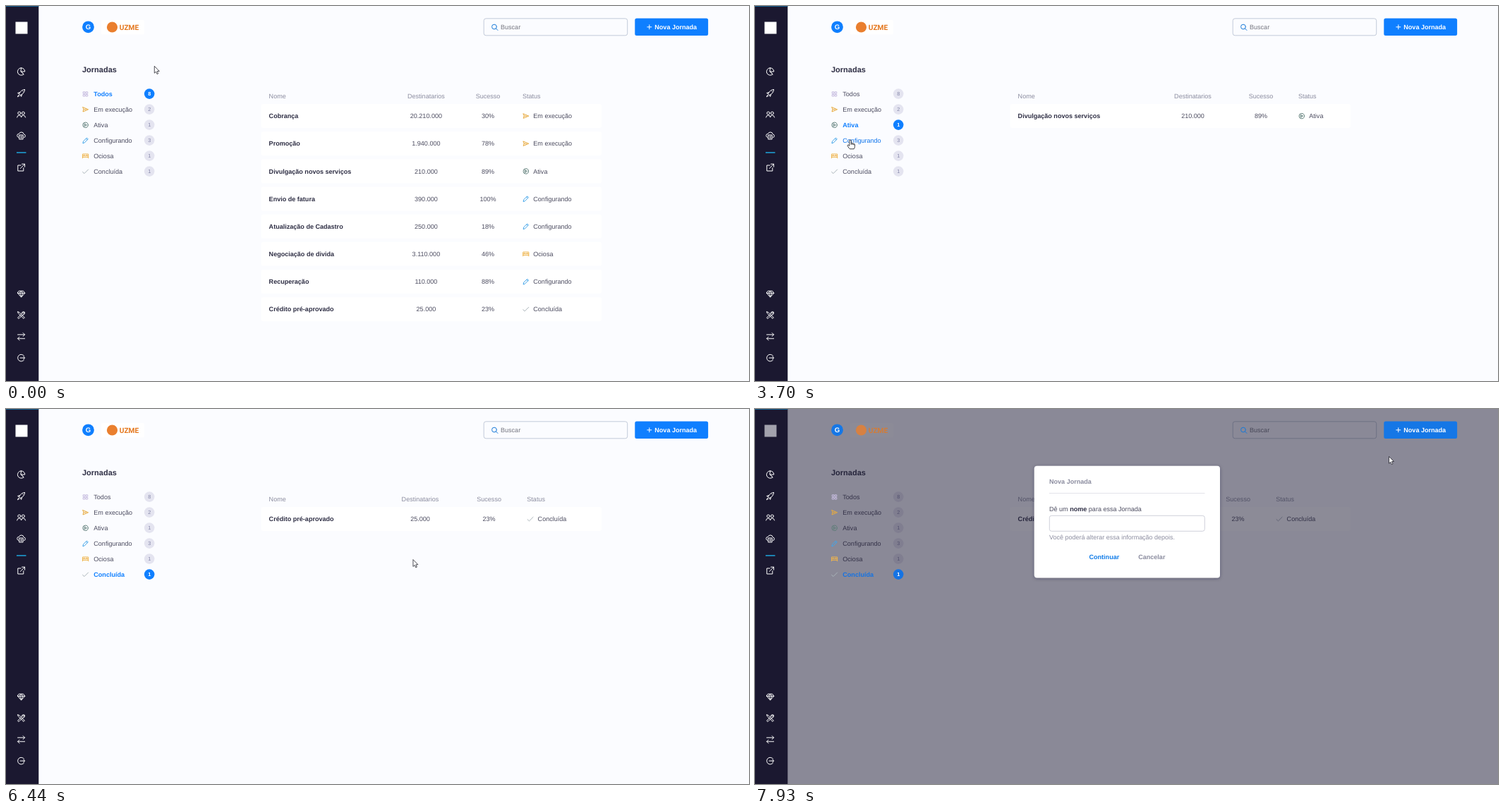
An HTML page for the animation above (8 s loop, 1053x532 px).

```html
<!DOCTYPE html>
<html lang="pt">
<head>
<meta charset="utf-8">
<title>Jornadas</title>
<style>
html, body { margin: 0; width: 100%; height: 100%; overflow: hidden; background: #fbfcff; }
svg { display: block; width: 1053px; height: 532px; }
text { font: 9.05px "Liberation Sans", Arial, sans-serif; fill: #4c4c60; text-rendering: geometricPrecision; white-space: pre; }
.b { font-weight: 700; }
.mid { text-anchor: middle; }
.name { font-weight: 700; fill: #2e2e44; }
.head, .mute { fill: #8b8c9f; }
.line { fill: none; stroke-width: 1; stroke-linecap: round; stroke-linejoin: round; }
.num { font-size: 7.4px; text-anchor: middle; }
#side .line { stroke: #fff; }
</style>
</head>
<body>
<svg viewBox="0 0 1053 532">
  <defs>
    <linearGradient id="glow"><stop offset="0" stop-color="#00e2ff"/><stop offset="1" stop-color="#0f7fff"/></linearGradient>
    <filter id="soft" x="-10%" y="-10%" width="120%" height="125%"><feDropShadow dx="0" dy="1" stdDeviation="2.5" flood-color="#1b1830" flood-opacity=".35"/></filter>
  </defs>
  <rect width="1053" height="532" fill="#fbfcff"/>
  <rect x="135" y="20" width="61" height="20.5" rx="2" fill="#fff"/>
  <rect x="677.2" y="17.8" width="203.5" height="24" rx="3" fill="#fbfcff" stroke="#c2cad9"/>
  <text x="701" y="33.1" style="fill:#74757f">Buscar</text>
  <text class="name" x="108" y="93.6" style="font-size:11px">Jornadas</text>
  <g id="table"></g>
  <rect id="shade" width="1053" height="532" fill="#1b1830" opacity=".5"/>

  <g id="side">
    <rect width="46.3" height="532" fill="#1b1830"/>
    <rect width="46.3" height="1" fill="#17608f"/>
    <rect id="logo" x="13.5" y="22.5" width="17" height="17"/>
    <rect x="15" y="207.2" width="13.5" height="1.5" fill="#1fa5dc"/>
  </g>
  <g id="brand">
    <circle cx="150.5" cy="30" r="7.6" fill="#ea7f2e"/>
    <text class="b" x="160.7" y="33.8" style="font:700 10.2px Roboto,sans-serif;fill:#e5781f">UZME</text>
  </g>
  <circle class="blue" cx="116.5" cy="29.8" r="8.4"/>
  <text class="b mid" x="116.5" y="33.2" style="font-size:9.6px;fill:#fff">G</text>
  <path class="line" stroke="#1779d8" d="M695.4 29.5a3.4 3.4 0 1 1-6.8 0a3.4 3.4 0 1 1 6.8 0M694.5 32l2.4 2.4"/>
  <rect id="btn" class="blue" x="891.3" y="17.5" width="103.8" height="24.5" rx="2.5"/>
  <path class="line" stroke="#fff" d="M908.8 29.8h6M911.8 26.8v6"/>
  <text class="b" x="919.3" y="33.1" style="fill:#fff">Nova Jornada</text>
  <g id="menu"></g>

  <g id="modal">
    <rect x="395.8" y="80.8" width="263.2" height="158.8" rx="4" fill="#fff" filter="url(#soft)"/>
    <text class="b mute" x="417" y="106.4">Nova Jornada</text>
    <path d="M417 119.5H637.5" stroke="#e3e3ea"/>
    <text x="417" y="145.1">Dê um <tspan class="name">nome</tspan> para essa Jornada</text>
    <rect x="417.3" y="151.3" width="220" height="22" rx="3" fill="#fff" stroke="#cfd0da"/>
    <text class="mute" x="417" y="185.3" style="font-size:8.98px">Você poderá alterar essa informação depois.</text>
    <text class="b" x="473.5" y="212.9" style="fill:#0f7be8">Continuar</text>
    <text class="b mute" x="543.2" y="212.9">Cancelar</text>
  </g>
  <circle id="click" cx="926" cy="37.5" r="6.3" fill="#d8e800" opacity=".6"/>
  <g id="cursor">
    <path id="arrow" d="M.3 .3V10.2L2.6 8.2 4.1 11.6 5.7 10.9 4.3 7.5H7.3Z" fill="#fff" stroke="#24242c" stroke-width=".8"/>
    <path id="hand" d="M-1.2 6.8V1Q-1.2 0 0 0T1.2 1V4.4Q2.6 3.9 3 5Q4.5 4.5 4.9 5.6Q6.4 5.4 6.4 7V9.5Q6.4 11 5.2 12.8H-.6Q-2 11.4 -3.8 8.6Q-4.2 7 -2.8 7L-1.2 8.4ZM1.2 4.4V6.8M3 5V7M4.9 5.6V7.3" fill="#fff" stroke="#1c1c22" stroke-width=".85"/>
  </g>
</svg>
<script>
const $ = id => document.getElementById(id);
const BLUE = [15, 127, 255], DEEP = [10, 98, 208], GREY = [228, 228, 240], INK = [76, 76, 96], SHADE = [27, 24, 48];
const mix = (a, b, p) => a.map((v, i) => v + (b[i] - v) * p);
const rgb = c => `rgb(${c.map(Math.round)})`;
const ease = p => p * p * (3 - 2 * p);
const clamp = p => Math.max(0, Math.min(1, p));
const icon = (x, y, d, color = '') => `<path class="line" transform="translate(${x} ${y})" d="${d}" ${color && `stroke="${color}"`}/>`;
const text = (x, y, s, cls) => `<text class="${cls}" x="${x}" y="${y + 3.2}">${s}</text>`;

// sidebar icons, centred on the column
const side = [
  [93, 'M-.4 -5.2A5.2 5.2 0 1 0 3.5 3.8L-.4 0ZM-.4 0H5.2A5.2 5.2 0 0 0 -.4 -5.2M0 .3L3.5 3.8'],
  [123.5, 'M5 -5Q0 -5 -3 1L-1 3Q5 0 5 -5M-2 -1L-5 0L-3 1M1 2L0 5L-1 3M-3.5 2.5L-5.3 5.3L-2.5 3.8M2.4 -2.4h.1'],
  [154, 'M-.8 -2a2 2 0 1 1-4 0a2 2 0 1 1 4 0M4.8 -2a2 2 0 1 1-4 0a2 2 0 1 1 4 0M-6 4Q-5.5 1 -2.8 1T0 4Q.3 1 2.8 1T6 4'],
  [184, 'M-3.5 2.3H-4Q-6 1.8 -5.8 -.5T-3.4 -2.4Q-2.5 -5 .3 -5T3.6 -2.2Q6 -1.6 5.8 .6T3.8 2.3M-2.5 -1H2.5V5H-2.5ZM-1 1H1M-1 3H1'],
  [229.2, 'M-.5 -3.2H-4.8V4.8H3.2V.5M1 -5H5V-1M5 -5L-1.2 1.2'],
  [408.3, 'M-3 -4H3L5.2 -1L0 4.8L-5.2 -1ZM-5.2 -1H5.2M-2 -1L0 4.8L2 -1L0 -4Z'],
  [438.7, 'M-4.8 -5L-2.5 -4L4.8 3.4L3.4 4.8L-4 -2.5ZM4.8 -4.2L3 -2.4L2.2 -3.2L4 -5Q1 -5.6 .6 -2.2L-5 3.6L-3.6 5L2 -.6Q5.6 -.6 4.8 -4.2'],
  [469, 'M-5 -2.8H5L2.6 -5.2M5 -2.8L2.6 -.4M5 2.8H-5L-2.6 .4M-5 2.8L-2.6 5.2'],
  [499.2, 'M4 -2.8A4.9 4.9 0 1 0 4 2.8M-1.5 0H5L3.2 -1.8M5 0L3.2 1.8']
];
$('side').insertAdjacentHTML('beforeend', side.map(([y, d]) => icon(21.6, y, d)).join(''));

const kinds = [
  ['Todos', 8, '#c6bcdf', 'M-3 -3H-.6V-.6H-3ZM.8 -3H3.2V-.6H.8ZM-3 .8H-.6V3.2H-3ZM.8 .8H3.2V3.2H.8Z'],
  ['Em execução', 2, '#e8ab40', 'M-3.6 -3.2L4 0L-3.6 3.2L-2.6 0ZM-2.6 0H1'],
  ['Ativa', 1, '#5d7d78', 'M3.7 0a3.7 3.7 0 1 1-7.4 0a3.7 3.7 0 1 1 7.4 0M-1 -1.6L1.7 0L-1 1.6Z'],
  ['Configurando', 3, '#42a5ea', 'M-3.6 3.6L-3 1L2 -3.7L3.7 -2L-1.2 3ZM1 -2.7L2.7 -1'],
  ['Ociosa', 1, '#efb44c', 'M-4 3V-2.8H4V3M-4 1.6H4M-4 -.4H4M-1.8 -.4V-1.6M1.8 -.4V-1.6'],
  ['Concluída', 1, '#aab4ba', 'M-4 .6L-1.6 2.8L4 -2.8']
];
const glyph = (x, y, k) => icon(x, y, kinds[k][3], kinds[k][2]);

$('menu').innerHTML = kinds.map(([label, n], i) => {
  const y = 124.8 + 22 * i;
  return glyph(112.6, y, i) + text(124.3, y, label, 'label') +
    `<circle cx="203.2" cy="${y - .2}" r="7.3"/><text class="num" x="203.2" y="${y + 2.4}">${n}</text>`;
}).join('');
const labels = [...document.querySelectorAll('.label')];
const dots = [...$('menu').querySelectorAll('circle')];
const nums = [...document.querySelectorAll('.num')];

const rows = [
  ['Cobrança', '20.210.000', 30, 1], ['Promoção', '1.940.000', 78, 1],
  ['Divulgação novos serviços', '210.000', 89, 2], ['Envio de fatura', '390.000', 100, 3],
  ['Atualização de Cadastro', '250.000', 18, 3], ['Negociação de divida', '3.110.000', 46, 4],
  ['Recuperação', '110.000', 88, 3], ['Crédito pré-aprovado', '25.000', 23, 5]
];
// column positions per filter: recipients, success, status
const columns = [[595.4, 683, 732], [534, 643.4, 702], [620.5, 717, 770], [587, 677.6, 728], [596.2, 698, 753], [587, 684.6, 738.3]];

function fillTable(k) {
  const [dest, rate, stat] = columns[k];
  const head = text(372.6, 128, 'Nome', 'head') + text(dest, 128, 'Destinatarios', 'head mid') +
    text(rate, 128, 'Sucesso', 'head mid') + text(stat, 128, 'Status', 'head');
  $('table').innerHTML = head + rows.filter(r => !k || r[3] === k).map(([name, n, p, kind], i) => {
    const y = 156.1 + 39.15 * i;
    return `<rect x="361.5" y="${y - 17}" width="482.5" height="34" rx="3" fill="#fff"/>` +
      text(372.6, y, name, 'name') + text(dest, y, n, 'mid') + text(rate, y, p + '%', 'mid') +
      glyph(stat + 4.8, y, kind) + text(stat + 15.3, y, kinds[kind][0], '');
  }).join('');
}

const clicks = [-999, 1215, 2690, 3700, 4390, 5255];
const loads = [0, 1810, 2950, 4010, 4790, 5640];
const path = [
  [430, 210, 85], [1200, 155, 141], [2150, 155, 141], [2650, 133, 168], [3230, 133, 168],
  [3650, 135, 190], [4040, 135, 190], [4370, 136, 212.6], [4700, 136, 212.6], [4940, 139, 232],
  [5200, 140.5, 234.6], [5480, 140.5, 234.6], [5800, 143, 240], [5890, 170, 245], [5965, 360, 238],
  [6030, 549, 227], [6290, 549, 227], [7120, 924, 41], [7200, 924, 41], [7286, 926, 35],
  [7680, 926, 35], [7905, 898.2, 67]
];
const last = (list, t) => list.filter(v => v <= t).length - 1;

function cursorAt(t) {
  const i = path.findIndex(p => p[0] > t);
  if (i === 0) return path[0].slice(1);
  if (i < 0) return path[path.length - 1].slice(1);
  const [t0, ...a] = path[i - 1], [t1, ...b] = path[i];
  return mix(a, b, ease((t - t0) / (t1 - t0)));
}

const show = (id, on) => $(id).style.display = on ? '' : 'none';
let shown = -1;

function draw(now) {
  // the screen updates about 13 times a second
  const t = 500 + 78 * Math.floor((now % 8000 - 482) / 78);
  const modal = t >= 7500;
  const [x, y] = cursorAt(t);
  const hover = !modal && x > 108 && x < 212 && y > 114 && y < 246 ? Math.min(5, Math.floor((y - 114) / 22)) : -1;
  const onBtn = !modal && x > 891 && x < 995 && y > 17 && y < 42.5;

  const table = Math.max(0, last(loads, t));
  if (table !== shown) fillTable(shown = table);

  const active = last(clicks, t);
  const fade = ease(clamp((t - clicks[active]) / 270));
  const dim = c => modal ? mix(c, SHADE, .5) : c;
  kinds.forEach((_, i) => {
    const on = i === active;
    const level = on ? fade : i === active - 1 ? 1 - fade : 0;
    const hot = i === hover;
    const tone = modal ? [20, 115, 228] : hot ? DEEP : BLUE;
    labels[i].style.fill = rgb(hot ? mix(BLUE, DEEP, on ? fade : .4) : level ? mix(INK, tone, level) : dim(INK));
    labels[i].style.fontWeight = on ? 700 : 400;
    dots[i].style.fill = rgb(level ? mix(GREY, tone, level) : dim(GREY));
    nums[i].style.fill = on ? '#fff' : rgb(dim([134, 136, 170]));
    nums[i].style.fontWeight = on ? 700 : 400;
  });

  show('shade', modal);
  show('modal', modal);
  show('click', t >= 7430 && !modal);
  $('logo').style.fill = modal ? '#a3a2ad' : '#fff';
  $('brand').style.opacity = modal ? .8 : 1;
  document.querySelectorAll('.blue').forEach(e => e.style.fill = modal ? '#1577e6' : '#0f7fff');
  if (onBtn) $('btn').style.fill = 'url(#glow)';

  const hand = hover >= 0 || onBtn || (modal && t < 7690);
  show('hand', hand);
  show('arrow', !hand);
  $('cursor').setAttribute('transform', `translate(${x} ${y})`);
}

function tick() {
  draw(performance.now());
  requestAnimationFrame(tick);
}
tick();
</script>
</body>
</html>
```
